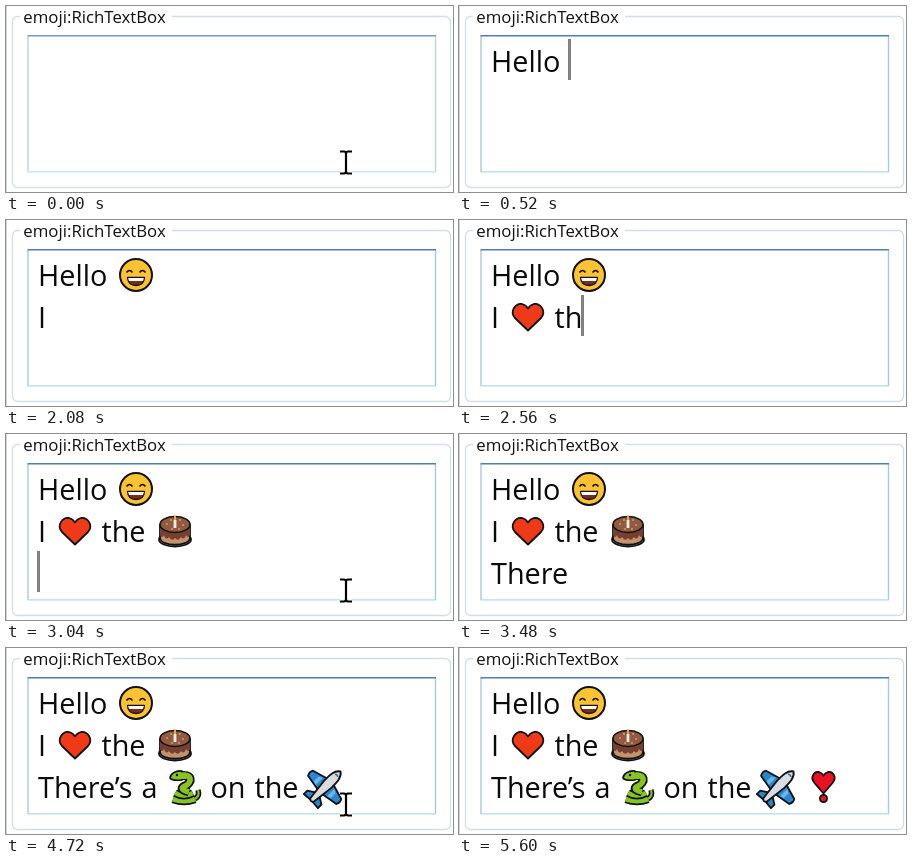
These frames come from a looping animation (447 by 186 pixels, 5.64 s). An HTML page with a canvas:

```html
<!DOCTYPE html>
<html lang="en">
<head>
<meta charset="utf-8">
<title>Emoji text box</title>
<style>
  html, body { margin: 0; width: 100%; height: 100%; overflow: hidden; background: #fff; }
  canvas { display: block; }
</style>
</head>
<body>
<canvas id="stage" width="447" height="186"></canvas>
<script>
const ctx = document.getElementById('stage').getContext('2d');
const LOOP = 5640;
const FONT = '"Open Sans", "Noto Sans", sans-serif';
const LEFT = 32, LINE = 42, ADVANCE = 38;

// Keys over time: "+" / "-" caret on / off, "<" backspace, "^" pointer shown.
// Any other character is typed, which also shows the caret and hides the pointer.
const KEYS = [
  [0, '^-'], [40, '+'], [120, 'H'], [200, 'e'], [240, 'l'], [320, 'l'], [400, 'o'], [520, ' '],
  [640, '-'], [760, '+'], [840, '😊'], [920, '-'], [1080, '+'],
  [1200, '<'], [1280, '-'], [1360, '😄'], [1440, '-'], [1520, '\n'], [1600, '-'],
  [1760, '+'], [1840, 'I'], [1920, ' '], [2080, '-'], [2200, '+'], [2280, '❤'],
  [2480, ' '], [2520, 't'], [2560, 'h'], [2600, 'e'], [2640, ' '],
  [2800, '-'], [2880, '🎂'], [3040, '\n^'],
  [3160, 'T'], [3200, 'h'], [3240, 'e'], [3320, 'r'], [3360, 'e'], [3480, '-'],
  [3680, '’'], [3720, 's'], [3760, ' '], [3800, 'a'], [3880, ' '], [3920, '🐍'], [4000, ' '],
  [4080, 'o'], [4120, 'n'], [4160, ' t'], [4240, 'h'], [4280, 'e'], [4320, ' '],
  [4440, '-'], [4560, '✈'], [4720, '-^'],
  [4880, ' '], [4960, '-'], [5040, '❣'], [5120, '-'], [5200, '+'],
  [5360, '-'], [5480, '+'], [5600, '-']
];

function fill(path, color) {
  ctx.fillStyle = color;
  ctx.fill(new Path2D(path));
}

function stroke(path, width, color = '#111') {
  ctx.lineWidth = width;
  ctx.strokeStyle = color;
  ctx.stroke(new Path2D(path));
}

function shape(path, color, width = 1.8) {
  fill(path, color);
  stroke(path, width);
}

function tube(path, width, color) {
  stroke(path, width);
  stroke(path, width - 3.4, color);
}

function disc(x, y, r, color, edge = 0, ry = r) {
  ctx.beginPath();
  ctx.ellipse(x, y, r, ry, 0, 0, 7);
  ctx.fillStyle = color;
  ctx.fill();
  if (edge) {
    ctx.lineWidth = edge;
    ctx.strokeStyle = '#111';
    ctx.stroke();
  }
}

function face() {
  disc(0, 0, 16, '#fbc334', 2);
  stroke('M-9.5-2.5Q-6.5-6.5-3.5-2.5M3.5-2.5Q6.5-6.5 9.5-2.5', 1.6);
}

// Each picture is drawn around its own centre.
const EMOJI = {
  '😊': { x: 111, draw() {
    face();
    disc(-10, 2, 3.2, '#f3855c');
    disc(10, 2, 3.2, '#f3855c');
    stroke('M-6 5.5Q0 11 6 5.5', 1.7);
  } },
  '😄': { x: 111, draw() {
    face();
    shape('M-8.5 2.5H8.5Q8 10.5 0 10.5T-8.5 2.5Z', '#7a2d1b', 1.3);
    fill('M-7.8 3H7.8L7 6H-7Z', '#fff');
  } },
  '❤': { x: 50, draw() {
    shape('M0 13.5L-13 1C-19-6-12-14-6-13Q-2-12 0-8.5Q2-12 6-13C12-14 19-6 13 1Z', '#f03a17');
  } },
  '🎂': { x: 150, draw() {
    disc(0, 8.5, 16, '#dcd6d0', 1.8, 7);
    shape('M-15-6V7C-14 16 14 16 15 7V-6Z', '#c4936b');
    fill('M-15-6H15V4Q13 8 11 4Q9 10 6 6Q3 11 0 7Q-3 11-6 6Q-9 10-11 4Q-13 8-15 4Z', '#744032');
    disc(0, -6.5, 15, '#925b40', 1.6, 8);
    stroke('M-9-7H-7M-5-11H-3M4-11H6M7-6H9M-4-2H-2M3-2H5', 1.4, '#c99a78');
    fill('M-1.4-11H1.4V-3H-1.4Z', '#f4eee6');
    stroke('M0-15V-11', 2, '#f5a535');
  } },
  '🐍': { x: 159, draw() {
    const green = '#86c424';
    tube('M11 12Q16 9 14 3', 5.5, green);
    tube('M-11 12Q0 16 11 12', 8.5, green);
    tube('M-9 6Q0 11 9 6', 8, green);
    tube('M-6-11C10-14 8-4 1-1Q-6 2 5 5', 9, green);
    shape('M-2-16C-8-17-14-13-14-9Q-12-6-2-7Z', green, 1.6);
    fill('M-4-14.5H2V-8H-4Z', green);
    disc(-7, -12, 1.2, '#111');
  } },
  '✈': { x: 300, draw() {
    ctx.rotate(Math.PI / 4);
    const wing = 'M-3-8L-20-3Q-22 0-20 4L-3 7ZM3-8L20-3Q22 0 20 4L3 7Z';
    shape(wing, '#2588d0');
    shape('M-2 10L-10 15V20L0 19L10 20V15L2 10Z', '#2588d0');
    fill('M-12-3L-8-5V5L-12 4ZM12-3L8-5V5L12 4Z', '#6db5e8');
    shape('M0-22C6-18 5-9 5-3L2.5 18Q0 22-2.5 18L-5-3C-5-9-6-18 0-22Z', '#d9dce0');
    stroke('M-2-16Q0-18 2-16', 1.6, '#356d96');
  } },
  '❣': { x: 345.5, draw() {
    shape('M0 6.5L-9-4C-14-10-9-16-4.5-15Q-1.5-14 0-11.5Q1.5-14 4.5-15C9-16 14-10 9-4Z', '#e81224');
    disc(0, 11.5, 3.6, '#e81224', 1.8);
  } }
};

function stateAt(time) {
  const state = { text: [], caret: false, pointer: false, focus: time >= 40 };
  for (const [at, keys] of KEYS) {
    if (at > time) break;
    for (const key of keys) {
      if (key === '^') state.pointer = true;
      else if (key === '-') state.caret = false;
      else {
        state.caret = true;
        if (key === '+') continue;
        state.pointer = false;
        if (key === '<') state.text.pop();
        else state.text.push(key);
      }
    }
  }
  return state;
}

function drawFrame(focus) {
  ctx.fillStyle = '#fff';
  ctx.fillRect(0, 0, 447, 186);
  ctx.fillStyle = '#d6d6d6';
  ctx.fillRect(0, 0, 1, 186);

  ctx.beginPath();
  ctx.roundRect(6.5, 10.5, 438, 171, 5);
  ctx.lineWidth = 1.3;
  ctx.strokeStyle = '#d3dfe6';
  ctx.stroke();
  ctx.fillStyle = '#fff';
  ctx.fillRect(14, 5, 152, 12);
  ctx.fillStyle = '#111';
  ctx.font = `16.8px ${FONT}`;
  ctx.wordSpacing = '0px';
  ctx.fillText('emoji:RichTextBox', 17.3, 17);

  const [top, side, bottom] = focus
    ? ['#4b7fb6', '#a5c9e3', '#b3d8ec']
    : ['#7799c8', '#b9d3e8', '#c4e2ec'];
  stroke('M22 30V166M429.5 30V166', 1.4, side);
  stroke('M21.5 165.9H430', 1.4, bottom);
  stroke('M21.5 29.8H430', 1.6, top);
}

function drawText({ text, caret }) {
  let row = 0, x = LEFT, run = '';
  const flush = () => {
    ctx.fillStyle = '#0a0a0a';
    ctx.fillText(run, x, 66.3 + row * LINE);
    x += ctx.measureText(run).width;
    run = '';
  };
  ctx.font = `28.8px ${FONT}`;
  ctx.wordSpacing = '1.5px';
  for (const key of text) {
    if (key === '\n') {
      flush();
      row++;
      x = LEFT;
    } else if (EMOJI[key]) {
      flush();
      x = EMOJI[key].x;
      ctx.save();
      ctx.translate(x + ADVANCE / 2, 55 + row * LINE);
      EMOJI[key].draw();
      ctx.restore();
      x += ADVANCE;
    } else run += key;
  }
  flush();
  if (caret) {
    ctx.fillStyle = '#808080';
    ctx.fillRect(Math.round(x) - 1, 33 + row * LINE, 3, 41);
  }
}

function drawPointer() {
  const beam = 'M334 145.5H338Q340 145.5 340 148Q340 145.5 342 145.5H346M340 147V166M334 167.5H338Q340 167.5 340 165Q340 167.5 342 167.5H346';
  stroke(beam, 4.4, '#fff');
  stroke(beam, 2.2, '#000');
}

ctx.lineJoin = 'round';
const start = performance.now();

function render() {
  const state = stateAt((performance.now() - start) % LOOP);
  drawFrame(state.focus);
  drawText(state);
  if (state.pointer) drawPointer();
  requestAnimationFrame(render);
}
render();
</script>
</body>
</html>
```
